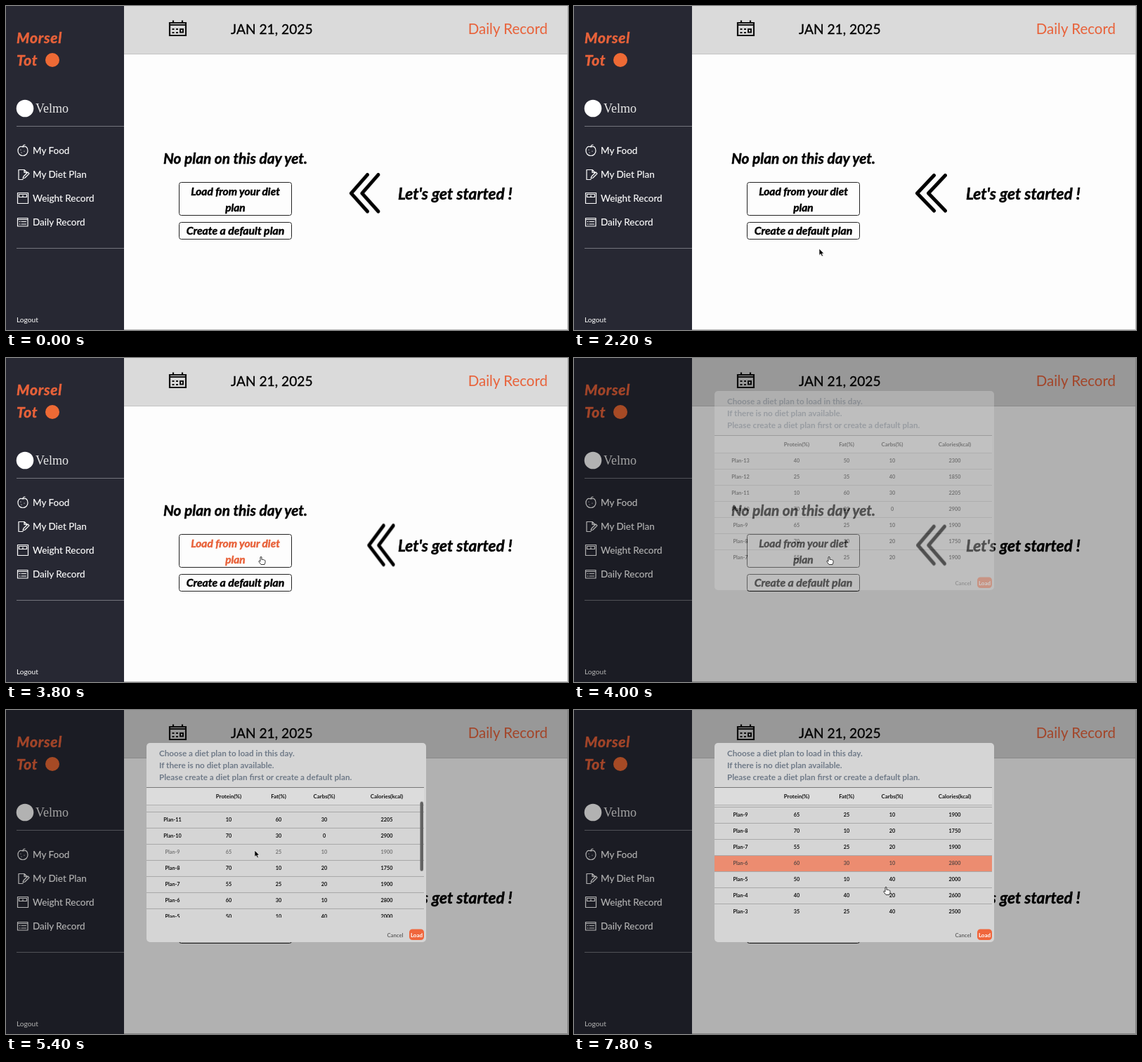
These frames come from a looping animation (800x462 px, 8000 ms). An HTML page:

```html
<!DOCTYPE html>
<html lang="en">
<head>
<meta charset="utf-8">
<title>Daily record</title>
<style>
  html, body { margin: 0; width: 100%; height: 100%; overflow: hidden; background: #fdfdfd; }
  svg { display: block; width: 100vw; height: 100vh; }
  text { font-family: Lato, sans-serif; }
  .hand { font-weight: 700; }
  .slant { font-style: italic; stroke: currentColor; stroke-width: .5px; fill: currentColor; }
  .mid { text-anchor: middle; }
  .menu { font-size: 13.5px; fill: #fff; stroke: #fff; stroke-width: .15px; }
  .icon { fill: none; stroke: #fff; stroke-width: 1.2; stroke-linecap: round; stroke-linejoin: round; }
  .brand { font-size: 21px; letter-spacing: .8px; color: #e8623a; }
  .note { font-size: 11.7px; fill: #6f7a88; }
  .head { font-size: 7.9px; fill: #111; }
  .row { font-size: 7.3px; fill: #111; }
  .row.hover { fill: #777; }
  .row rect { fill: transparent; }
  .row.picked { fill: #5d4a45; }
  .row.picked rect { fill: #ec8c70; }
  .row line { stroke: #a9a9a9; }
  .button { fill: none; stroke: #222; }
  #chevron { transform-box: fill-box; transform-origin: center; }
</style>
</head>
<body>
<svg viewBox="0 0 800 462" preserveAspectRatio="none">
  <defs><clipPath id="view"><rect x="200" y="135" width="396" height="161"/></clipPath></defs>

  <rect width="800" height="462" fill="#fdfdfd"/>
  <rect x="168" width="632" height="68" fill="#dadada"/>
  <path d="M168 68.500H800" stroke="#c4c4c4"/>
  <path d="M799.500 0V461.500H168" fill="none" stroke="#bbb"/>
  <rect width="168" height="462" fill="#272833"/>

  <text class="hand slant brand" x="15" y="53">Morsel</text>
  <text class="hand slant brand" x="15" y="85">Tot</text>
  <circle cx="66" cy="77" r="10" fill="#ee6a35"/>
  <circle cx="27" cy="146" r="12.3" fill="#fff"/>
  <text x="42" y="152" fill="#e8e8e8" style="font:18px 'Liberation Serif',serif">Velmo</text>
  <path d="M15 171.500H168M15 345.500H168" stroke="#74757d"/>

  <g class="icon">
    <path d="M24 201c-5-2-7 2-7 5.500c0 4 3 7 7 7s7-3 7-7c0-4-2-7.500-7-5.500zM24 201q0-3 3-3M21 205v.1M26 207v.1M22 209v.1"/>
    <path d="M24 247.500h-6v-14h8l4 4M26 233.500v4h4M24 246l1-3 6-6 2 2-6 6z"/>
    <path d="M16.500 266.500h15v15h-15zM18.500 268.500h11v4h-11zM24 272v-2"/>
    <path d="M16.500 302.500h14.500v11.500h-14.500zM16.500 304.500h14.500M19 307.500h1M22 307.500h6.500M19 311h1M22 311h6.500"/>
  </g>
  <text class="menu" x="38" y="211">My Food</text>
  <text class="menu" x="38" y="245">My Diet Plan</text>
  <text class="menu" x="38" y="279">Weight Record</text>
  <text class="menu" x="38" y="313">Daily Record</text>
  <text x="15" y="451" fill="#fff" font-size="10.2">Logout</text>

  <g fill="none" stroke="#111" stroke-width="2.200">
    <path d="M233 24h23v18h-23zM233 27h23M238 20.500v4M251 20.500v4"/>
    <path d="M236.500 33h3M242 33h3M236.500 38h3M242 38h3M248 33h4v4.500h-4z" stroke-width="2"/>
  </g>
  <text x="320" y="40" font-size="19.2" stroke="#000" stroke-width=".3">JAN 21, 2025</text>
  <text x="771" y="40" font-size="20.5" fill="#e8623a" text-anchor="end">Daily Record</text>

  <text class="hand slant" x="224" y="225" font-size="20.8">No plan on this day yet.</text>
  <rect class="button" x="246.500" y="251.500" width="160" height="47" rx="3"/>
  <g id="loadLabel" class="hand mid" font-size="15.5">
    <text class="slant" x="326.500" y="270">Load from your diet</text>
    <text class="slant" x="326.500" y="293">plan</text>
  </g>
  <rect class="button" x="246.500" y="308.500" width="160" height="24" rx="3"/>
  <text class="hand slant mid" x="326.500" y="326" font-size="15.8">Create a default plan</text>
  <path id="chevron" d="M512.500 241.500L488.500 267L512.500 292M528.500 241.500L504.500 267L528.500 292"
        fill="none" stroke="#000" stroke-width="5" stroke-linecap="round" stroke-linejoin="round"/>
  <text class="hand slant" x="558" y="276" font-size="22.7">Let's get started !</text>

  <rect id="shade" width="800" height="462" opacity="0"/>

  <g id="modal" opacity="0">
    <rect x="200" y="47" width="398" height="284" rx="5" fill="#d5d5d5"/>
    <text class="hand note" x="218" y="66">Choose a diet plan to load in this day.</text>
    <text class="hand note" x="218" y="83">If there is no diet plan available.</text>
    <text class="hand note" x="218" y="100">Please create a diet plan first or create a default plan.</text>
    <g clip-path="url(#view)"><g id="rows"></g></g>
    <rect x="200" y="110" width="395" height="25" fill="#dcdcdc"/>
    <path d="M200 110.500H595" stroke="#777"/>
    <path d="M200 135.500H595" stroke="#b0b0b0"/>
    <g id="heads"></g>
    <rect id="thumb" x="589.500" y="110" width="4.500" height="99" rx="2.200" fill="#636363"/>
    <text class="hand mid" x="554" y="323.500" font-size="7.7" fill="#666">Cancel</text>
    <rect x="574" y="312.500" width="21" height="15.500" rx="4.500" fill="#f0663c"/>
    <text class="hand mid" x="584.500" y="323.500" font-size="8" fill="#fff">Load</text>
  </g>

  <g id="cursor">
    <path id="arrow" d="M0 0V9.500L2.200 7.500L3.800 11L5.500 10.200L4 7H6.800Z" fill="#000" stroke="#fff" stroke-width=".7"/>
    <path id="pointer" d="M-1 1Q0-.5 1 1V4.500Q2 3.500 2.800 4.700Q4 4 4.500 5.200Q6 4.800 6 6.300V8.500L5 11.500H0L-3 7.500Q-3.500 6-2 6.200L-1 7.200Z"
          fill="#fff" stroke="#222" stroke-width=".9" stroke-linejoin="round"/>
  </g>
</svg>

<script>
const LOOP = 8000, TICK = 200, ROW = 23, TOP = 135;
const COLUMNS = [237, 317, 388, 453, 542];
const HEADS = ['', 'Protein(%)', 'Fat(%)', 'Carbs(%)', 'Calories(kcal)'];
// protein, fat, carbs, calories; from Plan-13 downwards
const PLANS = [
  [40, 50, 10, 2300], [25, 35, 40, 1850], [10, 60, 30, 2205], [70, 30, 0, 2900],
  [65, 25, 10, 1900], [70, 10, 20, 1750], [55, 25, 20, 1900], [60, 30, 10, 2800],
  [50, 10, 40, 2000], [40, 40, 20, 2600], [35, 25, 40, 2500], [50, 30, 20, 2100], [45, 25, 30, 1800]
];
const PICKED = 7;
const $ = id => document.getElementById(id);

const cells = (values, y, kind) => values.map((value, i) =>
  `<text class="hand mid ${kind}" x="${COLUMNS[i]}" y="${y}">${value}</text>`).join('');

$('heads').innerHTML = cells(HEADS, 125.5, 'head');
$('rows').innerHTML = PLANS.map((plan, i) => {
  const y = TOP + i * ROW;
  return `<g class="row"><rect x="200" y="${y}" width="395" height="${ROW}"/>` +
    `<line x1="200" x2="595" y1="${y + .5}" y2="${y + .5}"/>` +
    cells([`Plan-${13 - i}`, ...plan], y + 14.2, '') + '</g>';
}).join('');
const rows = [...$('rows').children];

const tracks = [];
function track(el, prop, steps, easing = 'ease-in-out') {
  const frames = steps.map(([ms, value]) => ({ offset: ms / LOOP, [prop]: value, easing }));
  const last = steps[steps.length - 1];
  frames.push({ offset: 1, [prop]: last[1] });
  if (steps[0][0] > 0) frames.unshift({ offset: 0, [prop]: steps[0][1], easing });
  const animation = el.animate(frames, { duration: LOOP, fill: 'both' });
  animation.pause();
  tracks.push(animation);
}
const hold = (id, prop, steps) => track($(id), prop, steps, 'steps(1, end)');
const move = (x, y) => `translate(${x}px, ${y}px)`;

track($('cursor'), 'transform', [
  [800, move(640, 470)], [1400, move(515, 378)], [2000, move(349, 346)], [2400, move(349, 346)],
  [3200, move(363, 283)], [4200, move(363, 283)], [4800, move(341, 173)], [5200, move(352, 196)],
  [5800, move(360, 213)], [6600, move(360, 213)], [7200, move(374, 210)], [7400, move(378, 212)],
  [7800, move(444, 252)]
]);
hold('cursor', 'opacity', [[0, 0], [1000, 1]]);
hold('pointer', 'opacity', [[0, 0], [3000, 1], [5200, 0], [6600, 1]]);
hold('arrow', 'opacity', [[0, 1], [3000, 0], [5200, 1], [6600, 0]]);
hold('loadLabel', 'color', [[0, '#000'], [3000, '#e8623a'], [4000, '#000']]);
hold('shade', 'opacity', [[0, 0], [4000, .3]]);
hold('modal', 'opacity', [[0, 0], [4000, .38], [4200, 1]]);
hold('thumb', 'opacity', [[0, 0], [5200, 1], [6600, .5], [6800, 0]]);
track($('rows'), 'transform', [[5000, move(0, 0)], [5900, move(0, -89)]]);
track($('thumb'), 'transform', [[5000, move(0, 0)], [5900, move(0, 51)]]);

const BOUNCE = 1005, BOUNCE_START = 510;
const bounce = $('chevron').animate([
  { offset: 0, transform: 'translateX(0) scale(1, 1)' },
  { offset: .1, transform: 'translateX(0) scale(.9, 1.1)' },
  { offset: .3, transform: 'translateX(25.5px) scale(.87, 1.1)' },
  { offset: .5, transform: 'translateX(0) scale(.95, 1.05)' },
  { offset: .57, transform: 'translateX(7px) scale(1, 1)' },
  { offset: .64, transform: 'translateX(0) scale(1, 1)' },
  { offset: 1, transform: 'translateX(0) scale(1, 1)' }
].map(frame => ({ ...frame, easing: 'cubic-bezier(.28, .84, .42, 1)' })),
{ duration: BOUNCE, iterations: Infinity });
bounce.pause();

// time, index of the row under the pointer
const HOVERS = [[0, -1], [4600, 3], [4800, 2], [5000, 1], [5200, 2], [5400, 4], [5600, 6], [5800, 7], [7800, -1]];

function render(t) {
  tracks.forEach(animation => { animation.currentTime = t; });
  bounce.currentTime = t + BOUNCE_START;
  const hovered = HOVERS.filter(([ms]) => ms <= t).pop()[1];
  rows.forEach((row, i) => {
    const state = i === PICKED && t >= 7400 ? 'picked' : i === hovered ? 'hover' : '';
    row.setAttribute('class', `row ${state}`);
  });
}

const start = performance.now();
function loop() {
  const t = (performance.now() - start) % LOOP;
  render(Math.floor(t / TICK) * TICK);
  requestAnimationFrame(loop);
}
loop();
</script>
</body>
</html>
```
